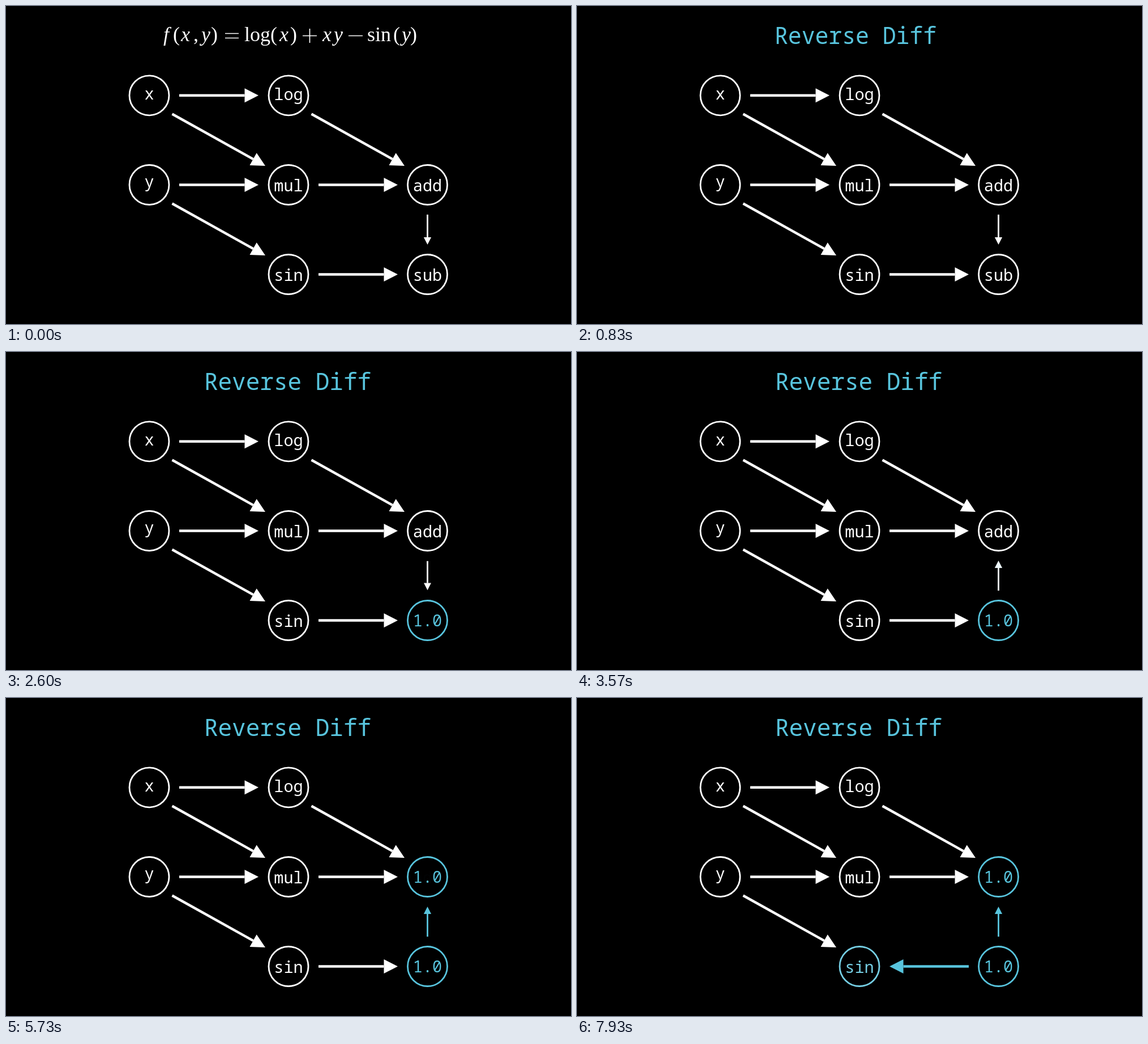
These frames come from a looping animation (998x561 px, 8 s). An HTML page:

```html
<!DOCTYPE html>
<html lang="en">
<head>
<meta charset="utf-8">
<title>Reverse Diff</title>
<style>
  html, body { margin: 0; width: 100%; height: 100%; overflow: hidden; background: #000; }
  svg { display: block; width: 100%; height: 100%; }
  .mono { font-family: "Noto Sans Mono", "DejaVu Sans Mono", monospace; text-anchor: middle; }
  .label { font-size: 28.6px; }
  .title { font-size: 41px; fill: #58c4dd; }
  .math { font: 36px "Liberation Serif", "Noto Serif", serif; fill: #fff; }
  .math .var { font-style: italic; }
  .math path { fill: none; stroke: #fff; stroke-width: 1.7; }
</style>
</head>
<body>
<svg viewBox="0 0 998 561"></svg>
<script>
const LOOP = 8000, STEP = 2500 / 3;
const WHITE = [255, 255, 255], BLUE = [88, 196, 221];
const svg = document.querySelector('svg');

function add(parent, tag, attrs, text) {
  const el = document.createElementNS(svg.namespaceURI, tag);
  for (const key in attrs) el.setAttribute(key, attrs[key]);
  if (text) el.textContent = text;
  return parent.appendChild(el);
}

const clamp = v => Math.max(0, Math.min(1, v));
const sigmoid = v => 1 / (1 + Math.exp(-v));
const smooth = v => {
  const edge = sigmoid(-5);
  return clamp((sigmoid(10 * (clamp(v) - 0.5)) - edge) / (1 - 2 * edge));
};
const tint = k => `rgb(${WHITE.map((c, i) => Math.round(c + (BLUE[i] - c) * k))})`;

// Formula and heading
const formula = add(svg, 'g', { class: 'math' });
const glyphs = [
  ['f', 278], ['(', 295], ['x', 309], [',', 331], ['y', 345], [')', 362],
  ['log', 421], ['(', 467], ['x', 483], [')', 502],
  ['x', 559], ['y', 579], ['sin', 638], ['(', 684], ['y', 699], [')', 714]
];
for (const [text, x] of glyphs)
  add(formula, 'text', { x, y: 62, class: /^[fxy]$/.test(text) ? 'var' : '' }, text);
add(formula, 'path', { d: 'M387 48.5h24M387 56.5h24M524 52.5h25M536.5 40v25M605 52.5h25' });

const heading = add(svg, 'text', { class: 'mono title', x: 497.5, y: 67 }, 'Reverse Diff');

// Step numbers say when a part turns blue, shows its value or reverses
const nodes = [
  { x: 253, y: 157.8, text: 'x', base: 165 },
  { x: 499, y: 157.8, text: 'log', base: 166 },
  { x: 253, y: 315.5, text: 'y', base: 320 },
  { x: 499, y: 315.5, text: 'mul', base: 327 },
  { x: 744.5, y: 315.5, text: 'add', base: 327, blueAt: 5, valueAt: 6 },
  { x: 499, y: 473.5, text: 'sin', base: 485, blueAt: 9 },
  { x: 744.5, y: 473.5, text: 'sub', base: 485, blueAt: 1, valueAt: 2 }
];
const arrows = [
  { from: [306, 157.8], to: [446, 157.8] },
  { from: [293.5, 190.5], to: [458, 282] },
  { from: [539.5, 190.5], to: [704, 282] },
  { from: [306, 315.5], to: [446, 315.5] },
  { from: [552, 315.5], to: [692, 315.5] },
  { from: [293.5, 348.5], to: [458, 440] },
  { from: [744.5, 368], to: [744.5, 421], tip: 13, width: 2.8, flipAt: 3, blueAt: 4 },
  { from: [552, 473.5], to: [692, 473.5], flipAt: 7, blueAt: 8 }
];

for (const n of nodes) {
  n.ring = add(svg, 'circle', { cx: n.x, cy: n.y, r: 35, fill: 'none', 'stroke-width': 2.8 });
  n.label = add(svg, 'text', { class: 'mono label', x: n.x, y: n.base }, n.text);
  if (n.valueAt)
    n.value = add(svg, 'text', { class: 'mono label', x: n.x, y: n.y + 10.5 }, '1.0');
}

for (const a of arrows) {
  const dx = a.to[0] - a.from[0], dy = a.to[1] - a.from[1];
  a.half = Math.hypot(dx, dy) / 2;
  const angle = Math.atan2(dy, dx) * 180 / Math.PI;
  const g = add(svg, 'g', {
    transform: `translate(${a.from[0] + dx / 2} ${a.from[1] + dy / 2}) rotate(${angle})`
  });
  a.line = add(g, 'path', { 'stroke-width': a.width || 4.4 });
  a.head = add(g, 'path', {});
}

function drawTitle(t) {
  const done = t >= STEP, p = smooth(t / STEP);
  const left = 275 + 75 * p ** 1.5;
  const right = 725 - 91 * (1 - (1 - p) ** 3.7);
  const fit = (a, b) => {
    const s = (right - left) / (b - a);
    return `translate(${left - a * s} 0) scale(${s} 1)`;
  };
  formula.setAttribute('transform', fit(275, 725));
  formula.setAttribute('opacity', done ? 0 : clamp((1 - p) * 1.2));
  heading.setAttribute('transform', done ? '' : fit(351, 644));
  heading.setAttribute('opacity', done ? 1 : clamp((p - 0.4) / 0.58));
}

function drawNode(n, progress, raw) {
  const shown = progress(n.valueAt);
  const color = tint(0.85 * smooth(1.6 * raw(n.blueAt)) + 0.15 * shown);
  n.ring.setAttribute('stroke', color);
  n.label.setAttribute('fill', color);
  if (!n.value) return;
  n.label.setAttribute('opacity', 1 - shown);
  n.value.setAttribute('fill', color);
  n.value.setAttribute('opacity', shown);
}

function drawArrow(a, progress) {
  const s = 1 - 2 * progress(a.flipAt), tip = a.tip || 24.5;
  const end = a.half * s, neck = (a.half - tip) * s, wing = tip * 0.51 * s;
  const color = tint(progress(a.blueAt));
  a.line.setAttribute('d', `M${-end} 0H${neck}`);
  a.line.setAttribute('stroke', color);
  a.head.setAttribute('d', `M${end} 0L${neck} ${wing}V${-wing}Z`);
  a.head.setAttribute('fill', color);
}

function draw(t) {
  const raw = step => step ? clamp(t / STEP - step) : 0;
  const progress = step => smooth(raw(step));
  drawTitle(t);
  nodes.forEach(n => drawNode(n, progress, raw));
  arrows.forEach(a => drawArrow(a, progress));
}

const start = performance.now();
function tick() {
  draw((performance.now() - start) % LOOP);
  requestAnimationFrame(tick);
}
tick();
</script>
</body>
</html>
```
